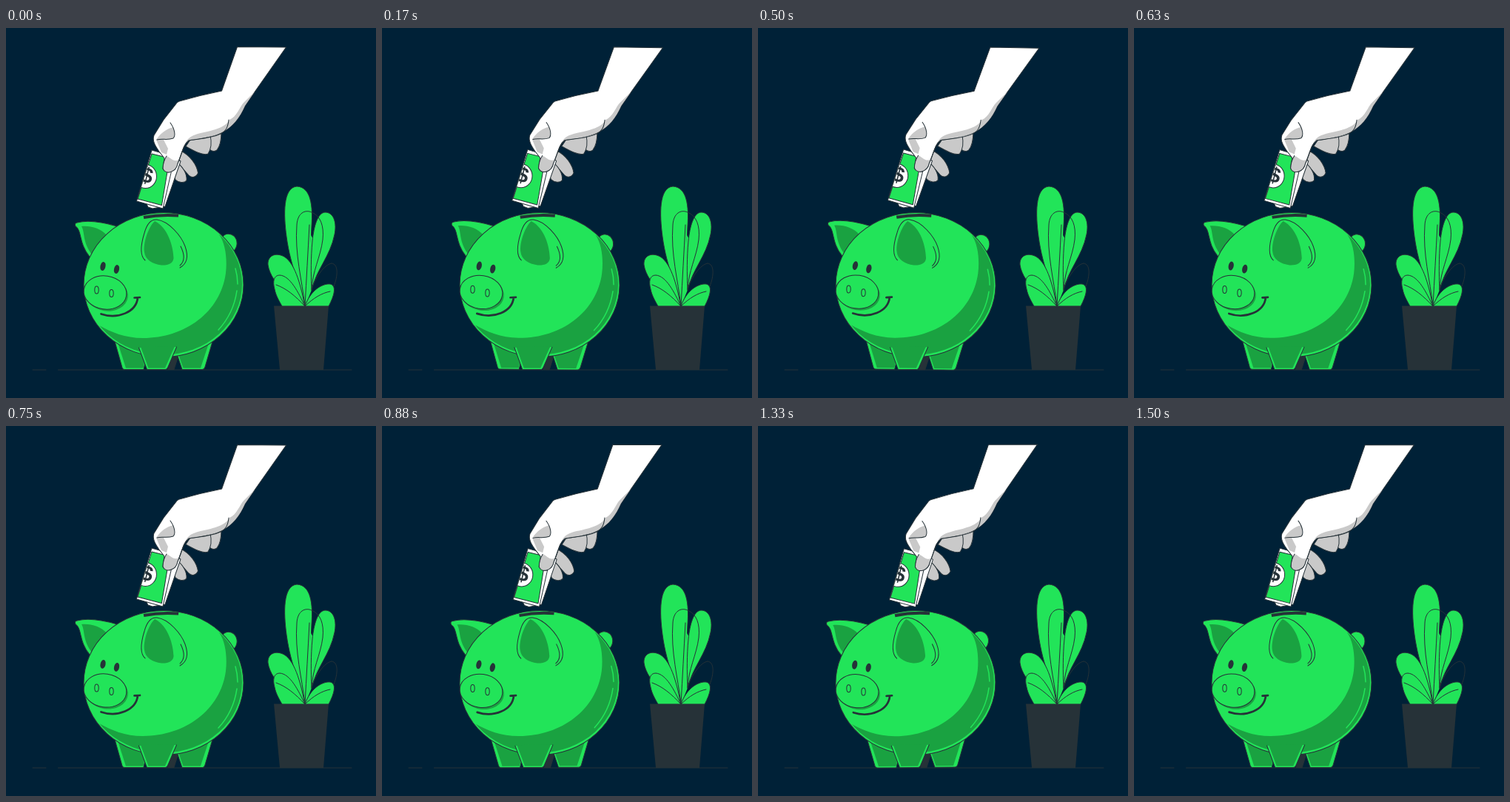
Write an HTML page that moves like this. It is 500 by 500 pixels and loops after 1.54 s.

```html
<!DOCTYPE html>
<html lang="en">
<head>
<meta charset="utf-8">
<title>Piggy bank</title>
<style>
  html, body { margin: 0; width: 100%; height: 100%; overflow: hidden; background: #002137; }
  svg { display: block; width: 100vw; height: 100vh; }
  path, ellipse { stroke: #263238; stroke-linecap: round; stroke-linejoin: round; }
  .light { fill: #22e459; }
  .dark { fill: #1aa241; }
  .white { fill: #fff; }
  .grey { fill: #c9c9c9; }
  .ink { fill: #263238; }
  .line { fill: none; }
  .flat { stroke: none; }
  .shine { fill: none; stroke: #22e459; stroke-width: 1.5; }
  .thick { fill: none; stroke-width: 2.7; }
</style>
</head>
<body>
<svg viewBox="0 0 500 500">
  <defs>
    <clipPath id="bill"><path d="M197 170L221 176L210.500 239.500L178 231Z"/></clipPath>
    <clipPath id="belly"><ellipse cx="212.500" cy="346" rx="106.500" ry="95.500"/></clipPath>
  </defs>

  <path class="line" d="M36 462H54M70.500 462H467"/>

  <g id="plant">
    <path class="light" d="M404 376C399 349 385 326 379 282C375 252 374 216 393 214C412 215 415 240 413 268C412 304 407 337 404 376Z"/>
    <path class="light flat" d="M404 376C404 340 410 305 412 280L418 290L413 354Z"/>
    <path class="light" d="M413 354C412 330 412 310 414 288C416 268 421 250 431 249C444 249 447 265 444 279C438 309 420 325 413 354Z"/>
    <path class="light" d="M404 376C399 352 392 319 376 309C363 302 353 309 354 320C356 334 366 345 374 357L386 376Z"/>
    <path class="light" d="M404 376C395 357 384 335 370 334C362 334 360 342 363 353C365 363 370 370 373 376Z"/>
    <path class="light" d="M404 376C411 355 427 345 438 346C447 348 444 361 436 376Z"/>
    <path class="line" d="M404 376C400 340 390 306 393 266C394 250 404 245 413 249C425 254 430 267 428 286C425 310 414 328 413 354"/>
    <path class="line" d="M404 376C406 339 408 304 410 266M404 376C391 362 379 352 365 347M404 376C415 365 427 358 438 356"/>
    <path class="line" d="M413 352C419 336 430 320 440 318C449 319 449 334 443 349"/>
    <path class="ink flat" d="M362 375.500H436L429 462H370Z"/>
  </g>

  <g id="pig">
    <path class="ink" d="M225 440L219 461.500H227L235 436Z"/>
    <path class="light" d="M146 420L157 459Q158 461.500 160 461.500H186L192 436Z"/>
    <path class="dark flat" d="M151 425L162 459.500H185.500L191 436Z"/>
    <path class="light" d="M230 438L238 461.500H265Q268 461.500 269 458L279 424Z"/>
    <path class="dark flat" d="M232 438L239.500 459.500H263L274 426Z"/>
    <path class="light" d="M292 284C294 278 302 276 308 281C314 287 313 296 308 301L300 298Z"/>
    <path class="light" d="M150 268C133 263 112 259 96 263Q92 264 94 268C103 274 98 291 113 309L119 312Z"/>
    <path class="dark flat" d="M136 280C128 271 115 267 102 268C107 276 103 289 116 306Z"/>
    <ellipse class="light" cx="213" cy="347" rx="108" ry="97.500"/>
    <g clip-path="url(#belly)">
      <path class="dark flat" d="M288 279C297 292 299 313 297 331C290 384 242 419 185 419C161 419 142 411 126 402L150 450H330V279Z"/>
    </g>
    <path class="shine" d="M310 325Q313 335 313 346M312 355C309 376 299 395 287 408"/>
    <path class="light flat" d="M179.500 432L190.500 461.500H215Q218 461.500 219 458L230.500 431Z"/>
    <path class="dark flat" d="M182 431L192.500 459.500H215L228 430Z"/>
    <path class="line" d="M179.500 432L190.500 461.500H215Q218 461.500 219 458L230.500 431"/>

    <path class="light flat" d="M200 259C186 264 180 294 184 309C193 323 224 324 237 323C244 317 247 308 242 295C233 276 216 259 200 259Z"/>
    <path class="dark flat" d="M201 261C193 268 185 290 187 303C188 313 198 319 210 320.500C219 321 226 318 226.500 311C226 295 219 270 201 261Z"/>
    <path class="line" d="M188 314C180 307 183 290 187 277C190 266 195 258 204 259C220 261 237 281 242 295C247 309 244 319 235 324M236 295C242 307 242 315 235 321"/>

    <path class="thick" style="stroke-width:4;stroke-linecap:butt" d="M186 256Q209 251.500 233 253.500"/>
    <ellipse class="ink flat" cx="131" cy="322" rx="3.500" ry="6" transform="rotate(12 131 322)"/>
    <ellipse class="ink flat" cx="149.500" cy="326" rx="3.500" ry="6" transform="rotate(12 149.500 326)"/>
    <ellipse class="dark flat" cx="136" cy="360" rx="29" ry="22.500" transform="rotate(8 136 360)"/>
    <ellipse class="light" cx="134" cy="357.500" rx="29" ry="22.500" transform="rotate(8 134 357.500)"/>
    <ellipse class="line" cx="122.500" cy="354" rx="2.700" ry="5"/>
    <ellipse class="line" cx="142.500" cy="358.500" rx="2.700" ry="5"/>
    <path class="thick" d="M128.500 386.500C151 394 176 384 178 364.500M173.500 364.500L181 364"/>
  </g>

  <g id="hand">
    <path class="grey" d="M270 146L291 140C291 150 290 159 285 165C281 168 275 166 273 161Z"/>
    <path class="grey" d="M249 151L276 145C278 154 277 164 273 170C266 173 252 165 243 160Z"/>
    <path class="grey" d="M236 166C249 172 258 185 259.500 196C257 202 251 203 247 199L229 179Z"/>
    <path class="grey" d="M229 180C239 187 245 197 244 206C241 210 233 209 229 205L224 192Z"/>
    <path class="white" d="M190 238L192 242L198 244L215 241L236 180L218 168Z"/>
    <path class="white" d="M197 165L228 174L212 244L176.500 234Z"/>
    <path class="light" d="M197 170L221 176L210.500 239.500L178 231Z"/>
    <g clip-path="url(#bill)">
      <ellipse class="white" cx="188.500" cy="200.500" rx="15" ry="16"/>
      <text class="ink" x="190.500" y="209" font-family="Liberation Sans, Arial, sans-serif" font-size="29" font-weight="bold" text-anchor="middle" transform="rotate(14 190.500 199)">$</text>
    </g>
    <path class="white" d="M312.500 25.500L378.500 26L323 105C316 121 307 133 292 141C278 148 258 150 247 152C239 158 238 170 232 183C230 195 216 199 212 190L214 176L207 167C203 161 197 153 200 145L213 124L231 101Q233 99 236 98.500C255 93 274 88.500 291.500 85Z"/>
    <path class="grey flat" d="M336 86L323 105C316 121 307 133 292 141C278 148 258 150 247 152L242 157C246 147 252 145 263 142C282 138 297 134 302 124C312 120 316 106 321 101Z"/>
    <path class="grey flat" d="M203 151C209 142 217 136 226 134Q229 143 227 149Q218 151 213 151L219 163L217 171L210 168Z"/>
    <path class="grey flat" d="M217 173C223 175 226 182 234 178C231 189 229 194 220 195C210 195 211 185 217 173Z"/>
    <path class="line" d="M222 128C229 138 229 146 226 149C218 152 211 149 204 151M301 124C300 133 298 139 290 143C278 149 258 150 247 152C239 158 238 170 232 183C230 195 216 199 212 190Q212 181 217 173"/>
  </g>
</svg>
<script>
  const LOOP = 1540;
  const swayers = [["pig", 208, 355], ["hand", 278, 136]]
    .map(([id, x, y]) => ({ node: document.getElementById(id), x, y }));

  // Linear sway: 0, +1, -1, 0 degrees at 0, 25, 75 and 100 % of the loop.
  function sway(p) {
    if (p < 0.25) return 4 * p;
    return p < 0.75 ? 2 - 4 * p : 4 * p - 4;
  }

  function draw(now) {
    const angle = sway((now % LOOP) / LOOP);
    for (const { node, x, y } of swayers) {
      node.setAttribute("transform", `rotate(${angle} ${x} ${y})`);
    }
    requestAnimationFrame(draw);
  }
  draw(performance.now());
</script>
</body>
</html>
```
